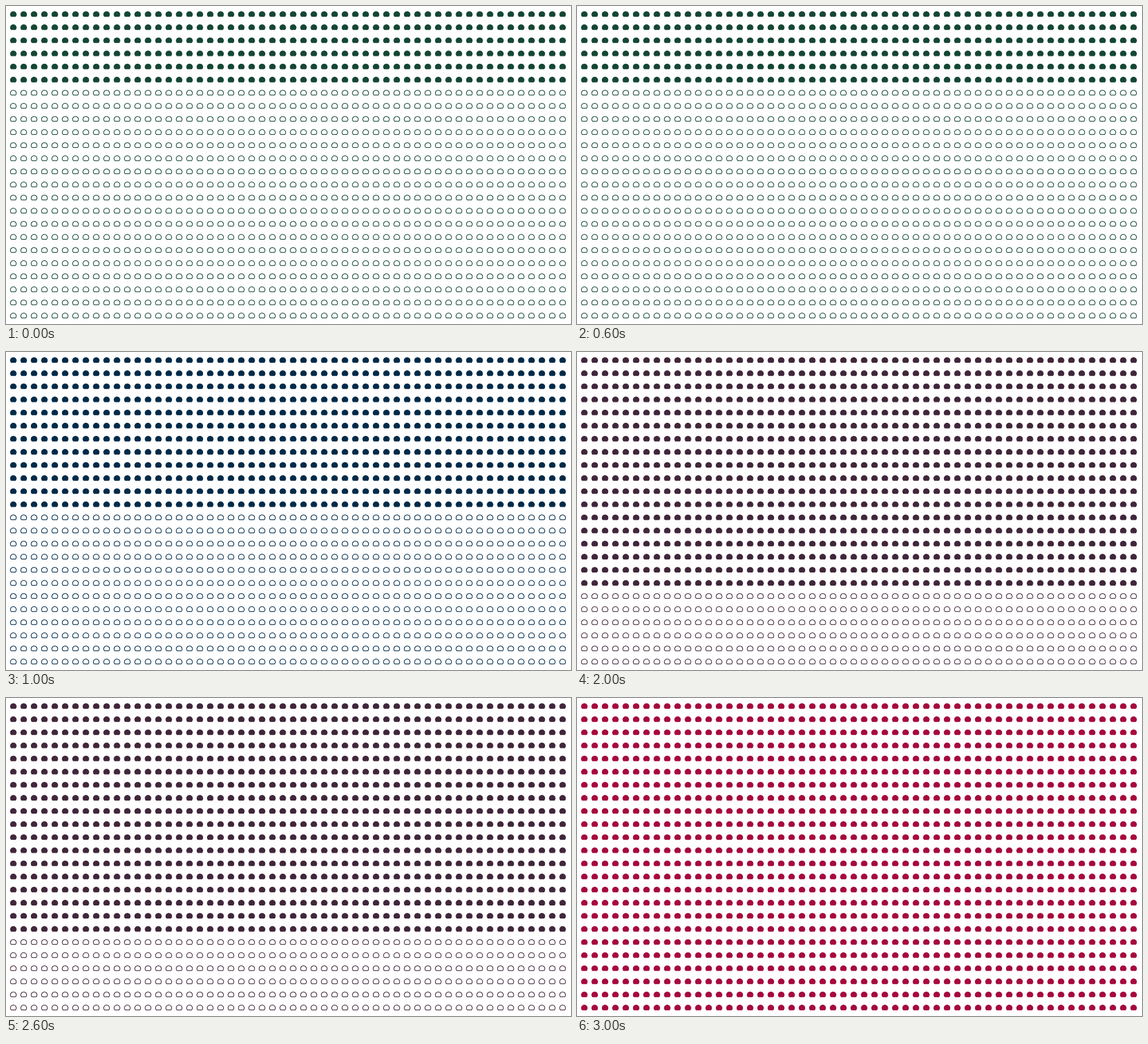
An HTML page for the animation above (4000 ms loop, 998 px wide and 561 px high).

```html
<!DOCTYPE html>
<html lang="en">
<head>
<meta charset="utf-8">
<title>Filling rows</title>
<style>
html, body { margin: 0; width: 100%; height: 100%; overflow: hidden; background: #fff; }
svg {
  display: block; width: 998px; height: 561px;
  animation: tint 4s step-end infinite;
}
path {
  fill: currentColor; stroke: currentColor;
  stroke-width: 1.25; stroke-linejoin: round;
}
.band1 { animation: fill1 4s step-end infinite; }
.band2 { animation: fill2 4s step-end infinite; }
.band3 { animation: fill3 4s step-end infinite; }
@keyframes tint {
  0% { color: #154734; }
  25% { color: #002b49; }
  50% { color: #41273b; }
  75%, 100% { color: #a6093d; }
}
@keyframes fill1 { 0% { fill-opacity: 0; } 25%, 100% { fill-opacity: 1; } }
@keyframes fill2 { 0% { fill-opacity: 0; } 50%, 100% { fill-opacity: 1; } }
@keyframes fill3 { 0% { fill-opacity: 0; } 75%, 100% { fill-opacity: 1; } }
</style>
</head>
<body>
<svg id="stage" viewBox="0 0 998 561"></svg>
<script>
const COLS = 54, BANDS = 4, ROWS_PER_BAND = 6;
const LEFT = 12.95, TOP = 14.95, STEP_X = 18.306, STEP_Y = 23.125;
const RADIUS = 5.15, BASE = 3.5;
const half = Math.sqrt(RADIUS ** 2 - BASE ** 2);

// A circle with its bottom cut flat.
const dome = (x, y) =>
  `M${(x - half).toFixed(3)} ${(y + BASE).toFixed(3)}` +
  `a${RADIUS} ${RADIUS} 0 1 1 ${(2 * half).toFixed(3)} 0z`;

const stage = document.getElementById('stage');
for (let band = 0; band < BANDS; band++) {
  let d = '';
  for (let r = 0; r < ROWS_PER_BAND; r++) {
    const y = TOP + (band * ROWS_PER_BAND + r) * STEP_Y;
    for (let c = 0; c < COLS; c++) d += dome(LEFT + c * STEP_X, y);
  }
  const path = document.createElementNS('http://www.w3.org/2000/svg', 'path');
  path.setAttribute('class', 'band' + band);
  path.setAttribute('d', d);
  stage.append(path);
}
</script>
</body>
</html>
```
